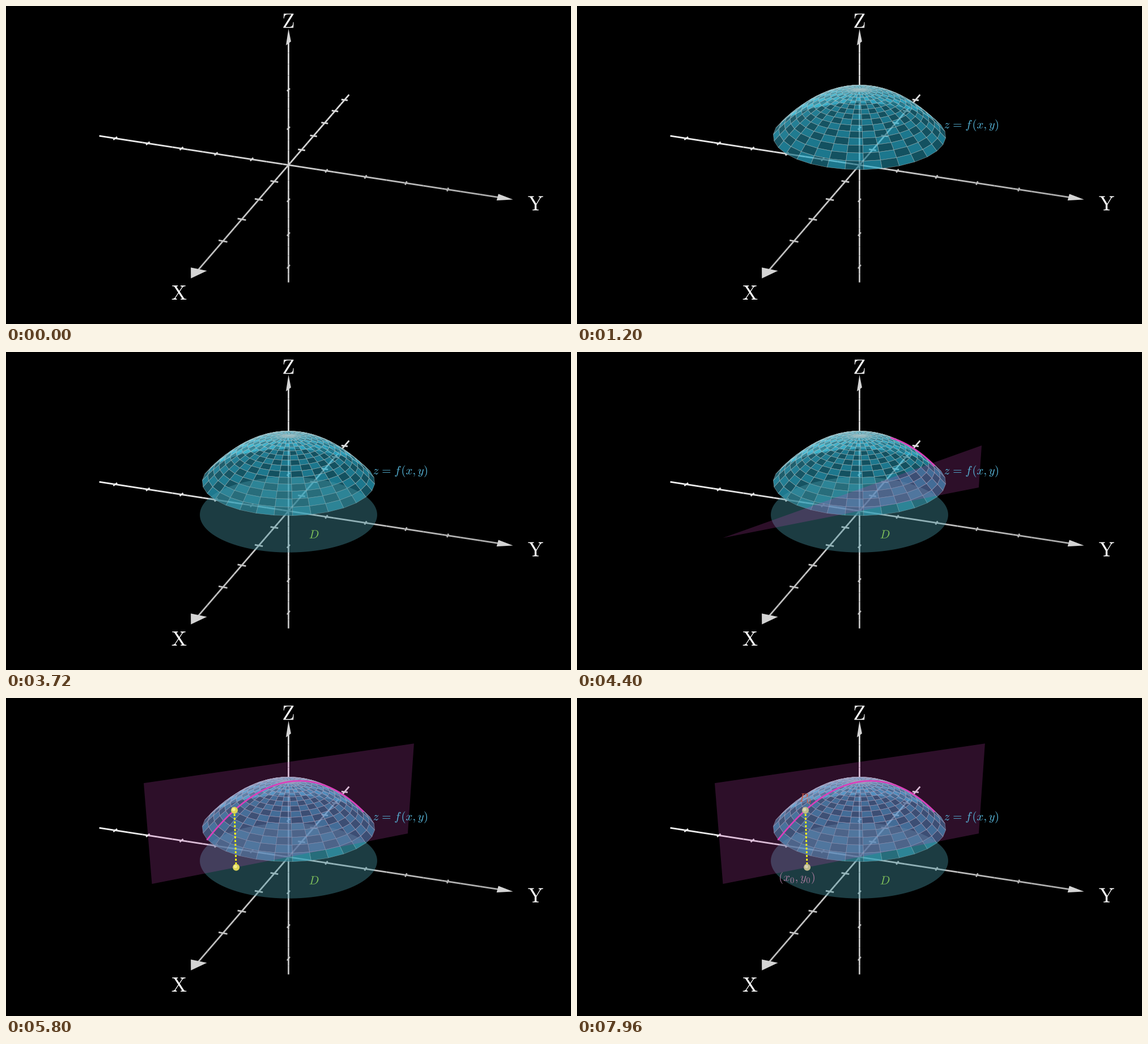
These frames come from a looping animation (997x561 px, 8000 ms). A matplotlib script:

```python
import numpy as np
import matplotlib as mpl
import matplotlib.pyplot as plt
from matplotlib.animation import FuncAnimation
from matplotlib.collections import LineCollection, PolyCollection
from matplotlib.patches import Circle, PathPatch, Polygon
from matplotlib.path import Path
from matplotlib.textpath import TextPath

W, H, DPI = 997, 561, 128
STEP, LOOP = 40, 8000
PX = 72 / DPI                    # one pixel in points
UNIT = H / 8                     # pixels per scene unit
PHI, THETA, FOCAL = np.radians(65), np.radians(20), 20
SUN = np.array([-7, -9, 10])

mpl.rcParams["mathtext.fontset"] = "cm"
fig = plt.figure(figsize=(W / DPI, H / DPI), dpi=DPI, facecolor="black")
ax = fig.add_axes([0, 0, 1, 1])
ax.set(xlim=(0, W), ylim=(H, 0))
ax.axis("off")


def project(points):
    """Scene points (..., 3) to pixels (..., 2) and depth."""
    x, y, z = np.moveaxis(np.asarray(points, float), -1, 0)
    a = -THETA - np.pi / 2
    right = x * np.cos(a) - y * np.sin(a)
    back = x * np.sin(a) + y * np.cos(a)
    up = back * np.cos(PHI) + z * np.sin(PHI)
    depth = z * np.cos(PHI) - back * np.sin(PHI)
    k = UNIT * FOCAL / (FOCAL - depth)
    return np.stack([W / 2 + right * k, H / 2 - up * k], -1), depth


def flat(points):
    return project(points)[0]


def linear(ms, start, span=800):
    return float(np.clip((ms - start) / span, 0, 1))


def smooth(ms, start, span=800):
    t = linear(ms, start, span)
    sig = lambda v: 1 / (1 + np.exp(-v))
    low = sig(-5)
    return float(np.clip((sig(10 * (t - 0.5)) - low) / (1 - 2 * low), 0, 1))


def height(x, y):
    return 2 - (x * x + y * y) / 4


# Axes -----------------------------------------------------------------
def grey(p):
    g = (205 - 3.2 * p[0] - 6.6 * p[1] + 3.5 * p[2]) / 255
    return (g, g, g)


def draw_axis(along, across, reach, ticks):
    along, across = np.array(along), np.array(across)
    stops = np.linspace(-reach, reach - 0.3, 25)
    parts = [(a * along, b * along) for a, b in zip(stops, stops[1:])]
    parts += [(t * along - 0.1 * across, t * along + 0.1 * across)
              for t in ticks if t]
    ax.add_collection(LineCollection(
        [flat(p) for p in parts], colors=[grey((p[0] + p[1]) / 2) for p in parts],
        linewidths=2.8 * PX, snap=False, zorder=1), autolim=False)
    base = (reach - 0.35) * along
    tip = [reach * along, base + 0.175 * across, base - 0.175 * across]
    ax.add_patch(Polygon(flat(tip), fc="#d4d4d4", ec="none", zorder=1))


draw_axis((1, 0, 0), (0, 1, 0), 5.5, range(-5, 5))
draw_axis((0, 1, 0), (1, 0, 0), 5.5, range(-5, 5))
draw_axis((0, 0, 1), (1, 0, 0), 3.5, range(-3, 3))


# Dome -----------------------------------------------------------------
RINGS, SPOKES = 15, 32
RADIUS = 1.5 * np.sqrt(2)


def make_dome():
    i, j = np.divmod(np.arange(RINGS * SPOKES), SPOKES)
    r = (i[:, None] + np.array([0, 1, 1, 0])) * RADIUS / RINGS
    a = (j[:, None] + np.array([0, 0, 1, 1])) * 2 * np.pi / SPOKES
    x, y = r * np.cos(a), r * np.sin(a)
    quads, depth = project(np.stack([x, y, height(x, y)], -1))

    mid = np.stack([x, y, height(x, y)], -1).mean(1)
    normal = np.stack([mid[:, 0] / 2, mid[:, 1] / 2, np.ones(len(mid))], -1)
    normal /= np.linalg.norm(normal, axis=1)[:, None]
    to_sun = SUN - mid
    to_sun /= np.linalg.norm(to_sun, axis=1)[:, None]
    light = 0.3 * (normal * to_sun).sum(1) ** 3

    pair = np.array([[41, 171, 202], [28, 117, 138]]) / 255
    rgb = np.clip(pair[(i + j) % 2] + light[:, None], 0, 1)
    rgba = np.column_stack([rgb, np.full(len(rgb), 0.7)])
    order = np.argsort(depth.mean(1))
    return quads[order], rgba[order], order


quads, quad_colors, born = make_dome()
dome = PolyCollection(quads, facecolors=quad_colors, edgecolors=(0.73, 0.78, 0.78, 0.6),
                      linewidths=0.65 * PX, snap=False, zorder=2)
ax.add_collection(dome, autolim=False)


# Disk, cutting plane and section curve --------------------------------
def sheet(color, alpha, z):
    return ax.add_patch(Polygon(np.zeros((3, 2)), fc=color, ec="none",
                                alpha=alpha, zorder=z))


disk = sheet("#4898a6", 0.4, 3)
plane = sheet("#d147bd", 0.22, 4)
curve, = ax.plot([], [], color="#db3fbb", lw=2.7 * PX, zorder=5)
CORNERS = np.array([(2.5, -2.5, 0), (-2.5, 2.5, 0), (-2.5, 2.5, 2.5),
                    (2.5, -2.5, 2.5), (2.5, -2.5, 0)])


def disk_outline(p):
    a = np.linspace(0, 2 * np.pi * p, 120)
    return flat(np.stack([2.22 * np.cos(a), 2.22 * np.sin(a), 0 * a], -1))


def plane_outline(p):
    q = min(4 * p, 3.9999)
    n = int(q)
    end = CORNERS[n] + (q - n) * (CORNERS[n + 1] - CORNERS[n])
    return flat(np.vstack([CORNERS[:n + 1], end, CORNERS[:1]]))


def section(p):
    t = np.linspace(1.5, 1.5 - 3 * p, 80)
    return flat(np.stack([-t, t, height(t, t)], -1))


# Points and dashed drop line ------------------------------------------
TOP, FOOT = flat([(1, -1, 1.5), (1, -1, 0)])
drop, = ax.plot([], [], color="#ffff10", lw=2.8 * PX, zorder=6, snap=False,
                ls=(0, (1.25, 1.1)), dash_capstyle="butt")


def make_dot(center):
    body = Circle(center, 6, ec="none", zorder=7)
    shine = Circle(center - 1.3, 3, ec="none", zorder=7.1)
    for part in (body, shine):
        ax.add_patch(part)
    return body, shine


dots = [make_dot(TOP), make_dot(FOOT)]


def mix(a, b, t):
    return tuple((np.array(a) * (1 - t) + np.array(b) * t) / 255)


# Labels ---------------------------------------------------------------
class Label:
    """Math text whose glyphs are outlined first and then filled."""

    def __init__(self, text, x, y, em, color):
        polys = TextPath((0, 0), text, size=em).to_polygons()
        ink = np.vstack(polys)
        shift = (ink.min(0) + ink.max(0)) / 2
        polys = [(p - shift) * (1, -1) + (x, y) for p in polys]
        self.glyphs = []
        for p in polys:
            if self.glyphs and self.same(self.glyphs[-1][0], p):
                self.glyphs[-1].append(p)
            else:
                self.glyphs.append([p])
        self.fills, self.lines = [], []
        for g in self.glyphs:
            shape = Path.make_compound_path(*[Path(p, closed=True) for p in g])
            self.fills.append(PathPatch(shape, fc=color, ec="none", zorder=9))
            self.lines.append(PathPatch(shape, fc="none", ec=color,
                                        lw=0.8 * PX, zorder=9))
        for patch in self.fills + self.lines:
            ax.add_patch(patch)

    @staticmethod
    def same(a, b):
        """True if one outline's middle lies within the other's width."""
        def holds(p, q):
            middle = (q[:, 0].min() + q[:, 0].max()) / 2
            return p[:, 0].min() < middle < p[:, 0].max()
        return holds(a, b) or holds(b, a)

    def show(self, p):
        n = len(self.glyphs)
        lag = min(4 / (n + 1), 0.2)
        for i, glyph in enumerate(self.glyphs):
            q = np.clip(p * (1 + lag * (n - 1)) - lag * i, 0, 1)
            traced, filled = min(2 * q, 1), max(2 * q - 1, 0)
            self.fills[i].set_alpha(filled)
            self.lines[i].set_visible(0 < q < 0.999)
            if 0 < q < 0.999:
                parts = [Path(g[:max(2, int(traced * len(g)))]) for g in glyph]
                self.lines[i].set_path(Path.make_compound_path(*parts))
                self.lines[i].set_alpha(1 - filled)


for name, x, y in (("X", 305.5, 505.5), ("Y", 934.5, 348), ("Z", 498.5, 26)):
    Label(rf"$\mathrm{{{name}}}$", x, y, 36.5, "white").show(1)

surface_label = Label(r"$z\hspace{0.12}=\hspace{0.12}f\hspace{0.11}(x,y)$",
                      695.8, 210.5, 20.8, "#58b8dc")
region_label = Label("$D$", 543.5, 321.5, 20.8, "#7fc15a")
top_label = Label("$P_0$", 402.5, 177.5, 20.8, "#cc5a45")
foot_label = Label("$(x_0,y_0)$", 388.5, 317.5, 20.8, "#a97a9e")


def update(n):
    ms = n * STEP

    seen = born < smooth(ms, 40) * len(born)
    dome.set_verts(quads[seen])
    dome.set_facecolor(quad_colors[seen])
    surface_label.show(linear(ms, 40))

    p = smooth(ms, 1640)
    disk.set_visible(p > 0)
    disk.set_xy(disk_outline(p))
    region_label.show(linear(ms, 2440))

    p = smooth(ms, 4042)
    plane.set_visible(p > 0)
    plane.set_xy(plane_outline(p))
    p = smooth(ms, 3985, 1000)
    curve.set_visible(p > 0)
    curve.set_data(*section(p).T)

    p = smooth(ms, 4840)
    drop.set_visible(p > 0)
    drop.set_data(*np.array([TOP, TOP + p * (FOOT - TOP)]).T)
    fade = smooth(ms, 6440)
    for body, shine in dots:
        body.set(radius=6 * p, visible=p > 0,
                 facecolor=mix((222, 212, 85), (190, 186, 140), fade))
        shine.set(radius=3 * p, visible=p > 0,
                  facecolor=mix((242, 236, 140), (214, 210, 180), fade))
    top_label.show(linear(ms, 6440))
    foot_label.show(linear(ms, 6440))
    return []


anim = FuncAnimation(fig, update, frames=LOOP // STEP, interval=STEP,
                     repeat=True, repeat_delay=0, blit=False)
plt.show()
```
